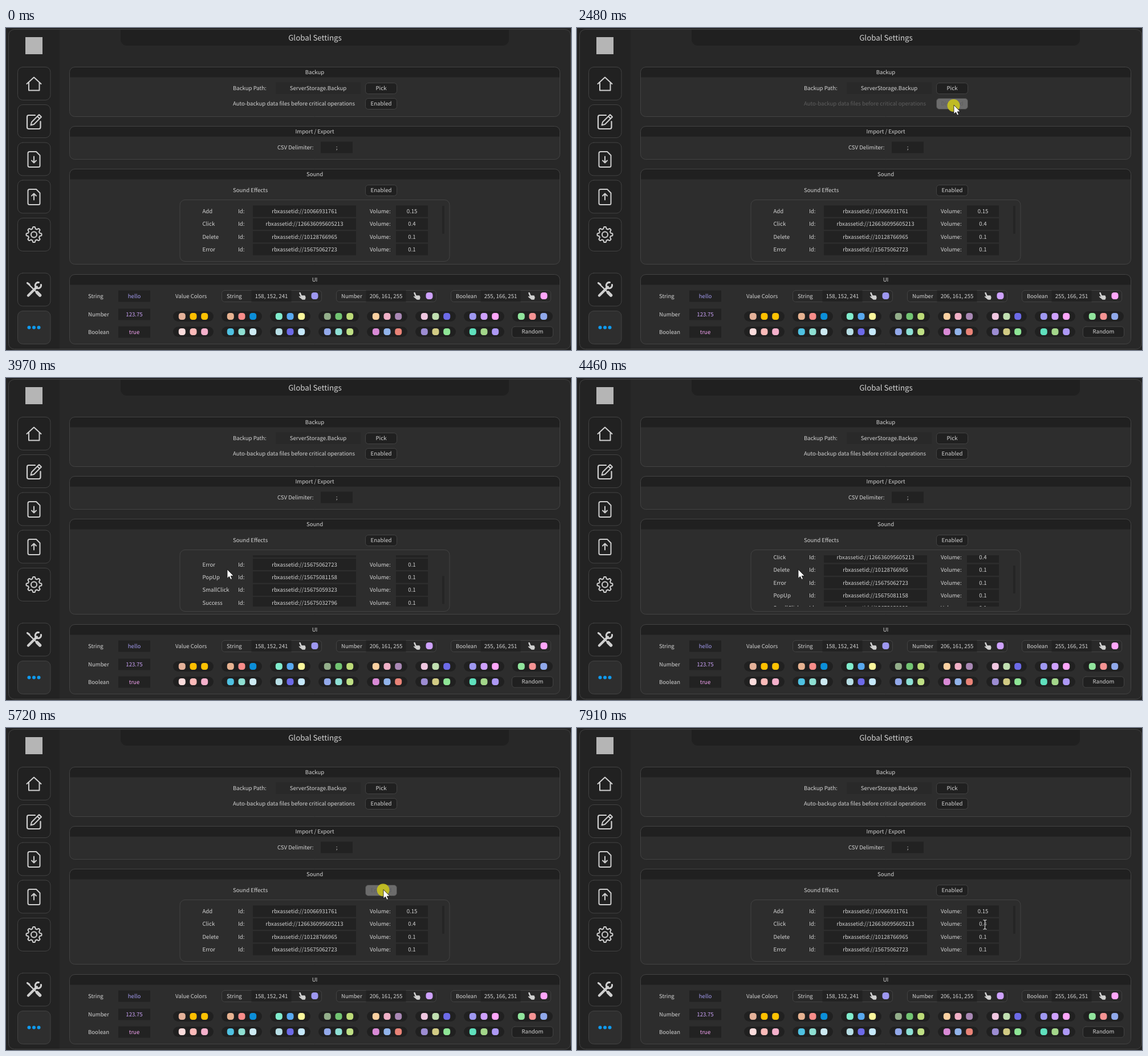
An HTML page with a canvas for the animation above (8000 ms loop, 991 px wide and 565 px high).

```html
<!DOCTYPE html>
<html lang="en">
<head>
<meta charset="utf-8">
<title>Global Settings</title>
<style>
  html, body { margin: 0; width: 100%; height: 100%; overflow: hidden; background: #232323; }
  canvas { display: block; width: 991px; height: 565px; }
</style>
</head>
<body>
<canvas id="stage" width="991" height="565"></canvas>
<script>
const ctx = document.getElementById('stage').getContext('2d');
const LOOP = 8000;
const DARK = '#202020', EDGE = '#434343', TEXT = '#d4d4d4', ICON = '#d0d0d0';
const FONT = '"Noto Sans CJK JP", "Noto Sans CJK SC", "Noto Sans CJK", sans-serif';

const PATH = [ // time, x, y of the pointer
  [680, 690, 22], [890, 661, 140], [1140, 661, 140], [1220, 661, 135.5],
  [2790, 661, 135.5], [3510, 464, 327], [3590, 436, 329], [3720, 388, 336],
  [4840, 388, 336], [4960, 567, 304.5], [5300, 662, 284], [6500, 662, 283.5],
  [6640, 662, 283], [6800, 662, 283], [7250, 588, 362], [7420, 588, 362], [7910, 715.5, 345]
];
const PRESSES = [[1430, 1560], [2480, 2750], [5600, 5760], [6640, 6760]];
const SOUNDS = [
  ['Add', '10066931761', '0.15'], ['Click', '126636095605213', '0.4'],
  ['Delete', '10128766965', '0.1'], ['Error', '15675062723', '0.1'],
  ['PopUp', '15675081158', '0.1'], ['SmallClick', '15675059323', '0.1'],
  ['Success', '15675032796', '0.1']
];
const PALETTES = [
  ['e5b299 fcbf00 fcc203', 'e8b391 fa8d8a 0c8ed8', '80eccd 58a9f0 fbf79b', '93ae8a 72c472 bcda77',
   'fbd0a0 f0b0c6 a988b5', 'f0c6e0 c0dfb0 6d6be8', '9e98f1 cea1ff ffa6fb', '90e59c f59393 8fa8ea'],
  ['fbdcdc fbbab9 f5b0cb', '4fc2e2 8edfd2 cdeaf2', 'b8dfe6 6d6ae8 c5e8fb', '93a9ea 8ee0d5 bfe085',
   'd98ad6 92b4ea ea8478', '9c8cd2 d2cb84 8ee596', '5fe0bd a3d68a ad98f5']
];
let fields = [];

const clamp = v => Math.max(0, Math.min(1, v));
const grey = v => `rgb(${v},${v},${v})`;
const shade = on => grey(Math.round(94 + on * 118));

function box(x, y, w, h, r, fill, edge) {
  ctx.beginPath();
  ctx.roundRect(x, y, w, h, r);
  if (fill) { ctx.fillStyle = fill; ctx.fill(); }
  if (edge) { ctx.strokeStyle = edge; ctx.lineWidth = 1; ctx.stroke(); }
}
function text(s, x, cy, align = 'left', color = TEXT, size = 9.6) {
  ctx.font = `${size}px ${FONT}`;
  ctx.textAlign = align;
  ctx.fillStyle = color;
  ctx.fillText(s, x, Math.round(cy + size * 0.36));
}
function field(s, cx, cy, w, color, fill = '#222') {
  box(cx - w / 2, cy - 10, w, 20, 0, fill);
  fields.push([cx - w / 2, cy - 10, w, 20]);
  text(s, cx, cy, 'center', color);
}
function button(s, cx, cy, w = 55, color = TEXT, fill = DARK) {
  box(cx - w / 2, cy - 9, w, 19, 5, fill, EDGE);
  text(s, cx, cy, 'center', color);
}
function toggle(on, isOn, flash, cy) {
  const fill = grey(Math.round(32 + flash * 76));
  button(isOn ? 'Enabled' : 'Disabled', 658, cy, 55, shade(on * (1 - flash)), fill);
}
function panel(title, y, h) {
  box(111.5, y + .5, 860, h, 9, '#2d2d2d');
  box(111.5, y + .5, 860, 18, [9, 9, 0, 0], DARK);
  box(111.5, y + .5, 860, h, 9, null, EDGE);
  text(title, 541.5, y + 10, 'center');
}
function dot(x, y, color) { box(x - 6, y - 6, 12, 12, 4.5, color); }
function line(d, width = 2, fill) {
  const path = new Path2D(d);
  ctx.lineWidth = width;
  ctx.strokeStyle = ICON;
  if (fill) { ctx.fillStyle = fill; ctx.fill(path); }
  ctx.stroke(path);
}
function disc(x, y, r, color) {
  ctx.beginPath();
  ctx.arc(x, y, r, 0, 7);
  ctx.fillStyle = color;
  ctx.fill();
}

function sidebar() {
  box(5, 3, 89, 560, [10, 0, 0, 10], '#232323');
  box(34, 16, 30, 30, 0, '#b5b5b5');
  [68.5, 134.5, 201, 267, 333.5, 430, 496.5].forEach((y, i) =>
    box(20.5, y, 57.5, 58, 9, i === 6 ? '#2e2e2e' : '#212121', EDGE));
  ctx.lineCap = ctx.lineJoin = 'round';
  line('M36.5 98 L49 86.5 L61.5 98 M40 96 V109.5 H58.5 V96');
  line('M51 153 H40 Q37 153 37 156 V174 Q37 177 40 177 H57.5 Q60.5 177 60.5 174 V164', 2.2);
  line('M43.5 170.5 L45 165 L58 152 L62 156 L49 169 Z M55 155 L59 159', 2);
  for (const y of [230.5, 296.5]) {
    line(`M41.5 ${y - 13.5} H53 L59.5 ${y - 7} V${y + 11} Q59.5 ${y + 13.5} 57 ${y + 13.5} H41.500 Q38.500 ${y + 13.5} 38.500 ${y + 11} V${y - 11} Q38.500 ${y - 13.5} 41.500 ${y - 13.5} Z`);
    const s = y < 260 ? 1 : -1;
    line(`M49 ${y - 5 * s} V${y + 6 * s} M45 ${y + 2 * s} L49 ${y + 6 * s} L53 ${y + 2 * s}`, 2);
  }
  let gear = '';
  for (let i = 0; i < 96; i++) {
    const a = i * Math.PI / 48;
    const r = 11.9 + 1.6 * Math.max(-1, Math.min(1, 1.8 * Math.cos(8 * a)));
    gear += `${i ? 'L' : 'M'}${49 + r * Math.cos(a)} ${362.5 + r * Math.sin(a)}`;
  }
  line(gear + 'Z M54 362.5 A5 5 0 1 0 44 362.5 A5 5 0 1 0 54 362.5');
  line('M38 448 L53 463', 2.4);
  line('M37.5 447.5 L41 450', 3.2);
  line('M54.5 464 L59.5 469', 5.5);
  line('M39 469.5 L54 454.5', 4.4);
  line('M57.5 446.5 A5.2 5.2 0 1 0 61.5 450.5', 3);
  for (const x of [40.5, 49, 57.5]) disc(x, 525.5, 3, '#0f9bf0');
}

function hand(x, y) {
  ctx.save();
  ctx.translate(x, y);
  line('M-3.5 -5 L-1 1', 2.6);
  line('M-1 0 L5 0 L6 3 L5 6 H1 L-4.5 1.500 L-1 2.500 Z', 1.4, ICON);
  ctx.restore();
}

function soundList(scroll, on) {
  box(305, 301.5, 473, 108, 9, null, EDGE);
  ctx.save();
  ctx.beginPath();
  ctx.rect(306, 311, 471, 90);
  ctx.clip();
  SOUNDS.forEach(([name, id, volume], i) => {
    const y = 321.5 + i * 22.4 - scroll;
    if (y < 300 || y > 412) return;
    text(name, 344.5, y, 'left', shade(on));
    text('Id:', 407, y);
    field('rbxassetid://' + id, 523.5, y, 181);
    text('Volume:', 638, y);
    field(volume, 712, y, 56);
  });
  box(765, 312 + scroll * 0.575, 4, 49, 0, '#252525');
  ctx.restore();
}

function uiPanel() {
  panel('UI', 432, 122);
  field('hello', 225, 470.5, 56, '#a39bf0');
  field('123.75', 225, 502.5, 56, '#cba2f8');
  field('true', 225, 533.5, 56, '#f8a5f6');
  text('String', 144, 470.5);
  text('Number', 144, 502.5);
  text('Boolean', 144, 533.5);
  text('Value Colors', 297, 470.5);
  [['String', '158, 152, 241'], ['Number', '206, 161, 255'], ['Boolean', '255, 166, 251']].forEach(([name, rgb], i) => {
    const x = 378.5 + i * 201;
    box(x, 460.5, 175, 20, 5, '#292929', EDGE);
    text(name, x + 8.5, 470.5);
    field(rgb, x + 87, 470.5, 70);
    hand(x + 140.5, 470);
    dot(x + 163, 470, `rgb(${rgb})`);
  });
  PALETTES.forEach((row, j) => row.forEach((colors, i) => {
    const x = 293 + i * 85, y = 506 + j * 27;
    box(x, y - 9, 71, 18, 9, DARK);
    colors.split(' ').forEach((c, k) => dot(x + 15.8 + k * 19.7, y, '#' + c));
  }));
  button('Random', 923.5, 533, 72);
}

function pointer(t) {
  if (t < PATH[0][0]) return;
  let i = PATH.findIndex(p => p[0] > t);
  if (i < 0) i = PATH.length - 1;
  const [t0, x0, y0] = PATH[i - 1], [t1, x1, y1] = PATH[i];
  const k = clamp((t - t0) / (t1 - t0));
  const x = x0 + (x1 - x0) * k, y = y0 + (y1 - y0) * k;
  if (PRESSES.some(([a, b]) => t >= a && t < b)) disc(x - .5, y + .5, 11, 'rgba(202,196,30,.9)');
  const overField = fields.some(([fx, fy, w, h]) => x > fx && x < fx + w && y > fy && y < fy + h);
  ctx.save();
  ctx.translate(x, y);
  if (overField) {
    const beam = new Path2D('M-3 -8 H-1 L0 -7 L1 -8 H3 M0 -7 V7 M-3 8 H-1 L0 7 L1 8 H3');
    ctx.strokeStyle = '#111';
    ctx.lineWidth = 2.4;
    ctx.stroke(beam);
    ctx.strokeStyle = '#e8e8e8';
    ctx.lineWidth = 1.1;
    ctx.stroke(beam);
  } else {
    const arrow = new Path2D('M0 0 V15.5 L3.5 12.2 L6 17.5 L8.5 16.5 L6.2 11.3 H11 Z');
    ctx.fillStyle = '#fff';
    ctx.fill(arrow);
    ctx.strokeStyle = '#111';
    ctx.lineWidth = .8;
    ctx.stroke(arrow);
  }
  ctx.restore();
}

// Level that drops after `off` and returns after `back`.
const level = (t, off, back) => t < back ? 1 - clamp((t - off) / 90) : clamp((t - back) / 90);
const flashAt = (t, presses) => Math.max(...presses.map(([a, b]) => t < a ? 0 : 1 - clamp((t - b) / 90)));

function scrollAt(t) {
  if (t < 3880 || t >= 4670) return 0;
  if (t < 4460) return 67 * (t < 4130 ? 1 - Math.exp((3845 - t) / 50) : 1);
  return 67 * Math.exp((4425 - t) / 44);
}

function draw(t) {
  fields = [];
  ctx.textRendering = 'geometricPrecision';
  ctx.fillStyle = '#232323';
  ctx.fillRect(0, 0, 991, 565);
  box(4.5, 2.5, 986, 561, 10, '#282828');
  sidebar();
  box(4.5, 2.5, 986, 561, 10, null, EDGE);
  box(201, 3, 681, 28, [0, 0, 11, 11], DARK);
  text('Global Settings', 542, 17.5, 'center', TEXT, 13.3);

  const backup = level(t, 1560, 2750), sound = level(t, 5760, 6760);
  panel('Backup', 68, 87);
  text('Backup Path:', 398, 105.5);
  field('ServerStorage.Backup', 547.5, 105.5, 149, TEXT, '#292929');
  button('Pick', 658, 105.5);
  text('Auto-backup data files before critical operations', 398, 132.5, 'left', shade(backup));
  toggle(backup, t < 1560 || t >= 2750, flashAt(t, PRESSES.slice(0, 2)), 132.5);

  panel('Import / Export', 172, 58);
  text('CSV Delimiter:', 476, 209.5);
  field(';', 580, 209.5, 56);

  panel('Sound', 247, 167);
  text('Sound Effects', 398, 284.5, 'left', shade(sound));
  toggle(sound, t < 5760 || t >= 6760, flashAt(t, PRESSES.slice(2)), 284.5);
  soundList(scrollAt(t), sound);

  uiPanel();
  pointer(t);
}

const start = performance.now();
function frame() {
  draw((performance.now() - start) % LOOP);
  requestAnimationFrame(frame);
}
frame();
</script>
</body>
</html>
```
